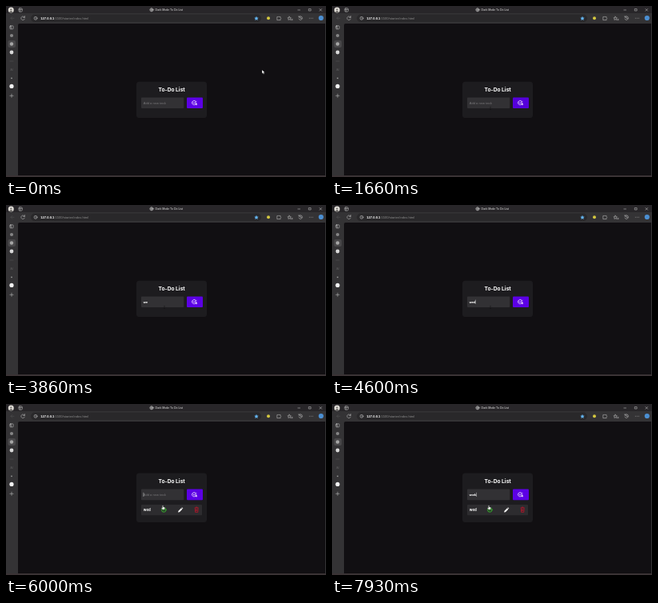
Write an HTML page that moves like this. It is 400 px wide and 214 px high and loops after 8000 ms.

```html
<!DOCTYPE html>
<html lang="en">
<head>
<meta charset="utf-8">
<title>To-do list demo</title>
<style>
  html, body { margin: 0; height: 100%; overflow: hidden; background: #110f12; }
  svg { display: block; width: 100vw; height: 100vh; }
  text { font-family: "Liberation Sans", Arial, sans-serif; white-space: pre; }
  .bold { font-family: Inter, sans-serif; font-weight: 700; fill: #fff; }
  .line { fill: none; stroke: #c4c4c4; stroke-width: .55; stroke-linecap: round; stroke-linejoin: round; }
  .dim { stroke: #555; }
</style>
</head>
<body>
<svg viewBox="0 0 400 214">
  <!-- Browser frame -->
  <rect width="400" height="214" fill="#343335"/>
  <rect width="400" height="9" fill="#282629"/>
  <path d="M15 212V24q0-2 2-2H399V212z" fill="#110f12"/>
  <rect y="212" width="400" height="2" fill="#3a3335"/>
  <rect x="31" y="10.5" width="288" height="9.6" rx="4.8" fill="#29282a"/>

  <!-- Title bar -->
  <circle cx="6.3" cy="5" r="3.5" fill="#dedbd5"/>
  <path d="M4.2 7.4q2.1-2.2 4.2 0-2.1 1.8-4.2 0" fill="#62605d"/>
  <circle cx="6.3" cy="4.4" r="1" fill="#62605d"/>
  <g class="line">
    <rect x="15.9" y="2.8" width="4.4" height="4.4" rx="1.2"/>
    <path d="M16.2 4.4h3.8M17.6 4.5v2.4"/>
    <circle cx="182" cy="4.8" r="2.1"/>
    <ellipse cx="182" cy="4.8" rx=".8" ry="2.1"/>
    <path d="M180 4.8h4"/>
    <path d="M364.9 5h2.6M392 3.6l2.6 2.6m0-2.6L392 6.2"/>
    <rect x="378.7" y="3.6" width="2.4" height="2.4"/>
  </g>
  <text x="186.6" y="6.1" font-size="3.6" fill="#e6e6e6">Dark Mode To Do List</text>

  <!-- Toolbar -->
  <g class="line">
    <path class="dim" d="M10 15.3H6m1.7-1.8L6 15.3l1.7 1.8"/>
    <path d="M23.2 14.2a2.3 2.3 0 1 0 .1 2M23.4 12.6v1.8h-1.8"/>
    <circle cx="37" cy="15.3" r="2"/>
    <path d="M37 15.3v.9M37 14.3v.1"/>
    <path d="M339.2 13.6h1.1q.7-1.3 1.4 0h1.4v1.3q1.2.7 0 1.4v1.3h-3.9z"/>
    <path d="M354.2 13.2l.7 1.4 1.5.2-1.1 1.1.3 1.5-1.4-.7-1.3.7.2-1.5-1.1-1.1 1.5-.2zM357 16.4h1M356.8 17.6h1.2"/>
    <path d="M366.2 13.8a2.3 2.3 0 1 1-.2 2.3M366 12.6v1.5h1.5M368.2 14v1.5h1.2"/>
    <path d="M379.3 15.3h.1M381.3 15.3h.1M383.3 15.3h.1"/>
  </g>
  <text x="43.3" y="16.8" font-size="4.1" fill="#8c8c8c"><tspan fill="#fff" font-weight="700">127.0.0.1</tspan>:5500/starter/index.html</text>
  <path d="M313 12.8l.8 1.7 1.9.3-1.4 1.3.4 1.9-1.7-.9-1.7.9.4-1.9-1.4-1.3 1.9-.3z" fill="#63b4f2"/>
  <circle cx="328" cy="15.3" r="2" fill="#d3c73f"/>
  <circle cx="393.8" cy="15" r="3.1" fill="#4b8fd2"/>

  <!-- Sidebar -->
  <rect x="2.5" y="43" width="9.5" height="9" rx="2" fill="#49484a"/>
  <g class="line">
    <rect x="4.9" y="24.8" width="4.2" height="4" rx=".7"/>
    <path d="M6.3 25v3.6M5 26h1"/>
    <path class="dim" d="M5 69h4"/>
    <path d="M4.9 112.3h4.2M7 110.2v4.2"/>
  </g>
  <circle cx="7" cy="37" r="2.1" fill="#858585"/>
  <circle cx="7" cy="47.5" r="2.2" fill="#a5a5a5"/>
  <circle cx="7" cy="58" r="2.4" fill="#d8d8d8"/>
  <text x="7" y="80.5" font-size="3.4" fill="#606060" text-anchor="middle">AI</text>
  <circle cx="7" cy="90.3" r=".9" fill="#999"/>
  <circle cx="7" cy="100.4" r="2.6" fill="#f3f3f3"/>

  <!-- To-do card -->
  <rect id="card" x="163" width="88" rx="3.5" fill="#1d1c1f"/>
  <g id="form">
    <text class="bold" x="207.2" y="106.5" font-size="6.65" text-anchor="middle">To-Do List</text>
    <rect x="169" y="114.4" width="53.3" height="13.6" rx="1" fill="#323134"/>
    <text id="entry" x="171.7" y="122.7" font-size="4.1"></text>
    <path id="caret" d="M0 118.6v5.2" stroke="#ddd" stroke-width=".5"/>
    <rect x="226" y="114.4" width="20" height="13.6" rx="1" fill="#5c00e5"/>
    <rect id="hover" x="226" y="114.4" width="20" height="13.6" rx="1" fill="#3700b3"/>
    <g class="line" style="stroke:#fff;stroke-width:.75">
      <path d="M236.9 119.1a2.6 2.6 0 1 0 .9 2M234.1 120.9l1.1 1.1 2.7-2.8"/>
      <path d="M237.1 123h1.6M237.9 122.2v1.6"/>
    </g>
  </g>
  <g id="item">
    <rect x="169" y="126" width="76" height="13.2" rx="1" fill="#2d2c2f"/>
    <text class="bold" x="171.8" y="134.2" font-size="4.4">wed</text>
    <g class="line" style="stroke:#36b52c;stroke-width:.9">
      <circle cx="197.3" cy="132.5" r="2.8"/>
      <path d="M196 132.5l1 1 1.8-2"/>
    </g>
    <path d="M215 135.6l.5-1.8 3.5-3.5 1.4 1.4-3.5 3.5zM219.4 129.9l.6-.6 1.4 1.4-.6.6z" fill="#f4f4f4"/>
    <path d="M235.7 130h5M237.3 129.9v-.8h1.8v.8M236.3 130.3l.3 5.1h3.2l.3-5.1M237.6 131.5v2.7M238.8 131.5v2.7"
      fill="none" stroke="#b5162b" stroke-width=".8"/>
  </g>

  <!-- Pointers -->
  <path id="arrow" d="M0 0v4.5l1.1-1 .8 1.8.9-.4-.8-1.7h1.5z" fill="#fff" stroke="#222" stroke-width=".25"/>
  <path id="beam" d="M-.6-1.6h1.2M0-1.6v3.2M-.6 1.6h1.2" fill="none" stroke="#111" stroke-width=".4"/>
  <path id="hand" d="M-.5-1q0-.8.5-.8t.5.8v1.5l1.6.3q.5.2.4.8l-.4 1.9H-.4L-1.7 1.7q.1-.7.8-.2l.4.4z"
    fill="#fff" stroke="#222" stroke-width=".25"/>
</svg>
<script>
  const LOOP = 8000, FOCUS = 1800, ADD = 5900;
  const HOVER = 1460, HOVER_FADE = 300;
  const typing = [
    [3060, "w"], [3600, "we"], [4400, "wed"], [4930, "wed "],
    [ADD, ""], [6860, "w"], [7200, "wo"], [7460, "wor"], [7730, "work"]
  ];
  const pointerPath = [[0, 320, 80], [100, 320, 80], [800, 325, 104], [980, 325, 104], [1600, 198, 128]];
  const el = id => document.getElementById(id);
  const show = (id, on) => el(id).setAttribute("visibility", on ? "visible" : "hidden");
  const move = (id, x, y) => el(id).setAttribute("transform", `translate(${x} ${y})`);
  const ease = p => p * p * (3 - 2 * p);

  function pointerAt(t) {
    const next = pointerPath.findIndex(key => key[0] > t);
    if (next < 0) return pointerPath.at(-1).slice(1);
    const [t0, x0, y0] = pointerPath[next - 1], [t1, x1, y1] = pointerPath[next];
    const p = ease((t - t0) / (t1 - t0));
    return [x0 + (x1 - x0) * p, y0 + (y1 - y0) * p];
  }

  function render(t) {
    const added = t >= ADD;
    el("card").setAttribute("y", added ? 86.5 : 94.7);
    el("card").setAttribute("height", added ? 61.5 : 45.3);
    move("form", 0, added ? -7.8 : 0);
    show("item", added);

    const typed = typing.findLast(step => step[0] <= t)?.[1] ?? "";
    const entry = el("entry");
    entry.textContent = typed || "Add a new task";
    entry.setAttribute("fill", typed ? "#fff" : "#777679");
    entry.setAttribute("stroke", typed ? "#fff" : "none");
    entry.setAttribute("stroke-width", .15);
    move("caret", 171.9 + (typed ? entry.getComputedTextLength() : 0), 0);
    show("caret", t >= FOCUS && (t < 3600 || t > 4200));

    // The button darkens briefly as the pointer crosses it.
    el("hover").setAttribute("opacity", Math.max(0, 1 - Math.abs(t - HOVER) / HOVER_FADE) * .6);

    const [x, y] = pointerAt(t);
    const overInput = !added && x < 222;
    show("arrow", !added && !overInput);
    show("beam", overInput);
    show("hand", added);
    move("arrow", x, y);
    move("beam", x, y);
    move("hand", 196, 128.5);
  }

  function frame() {
    render(performance.now() % LOOP);
    requestAnimationFrame(frame);
  }
  frame();
</script>
</body>
</html>
```
